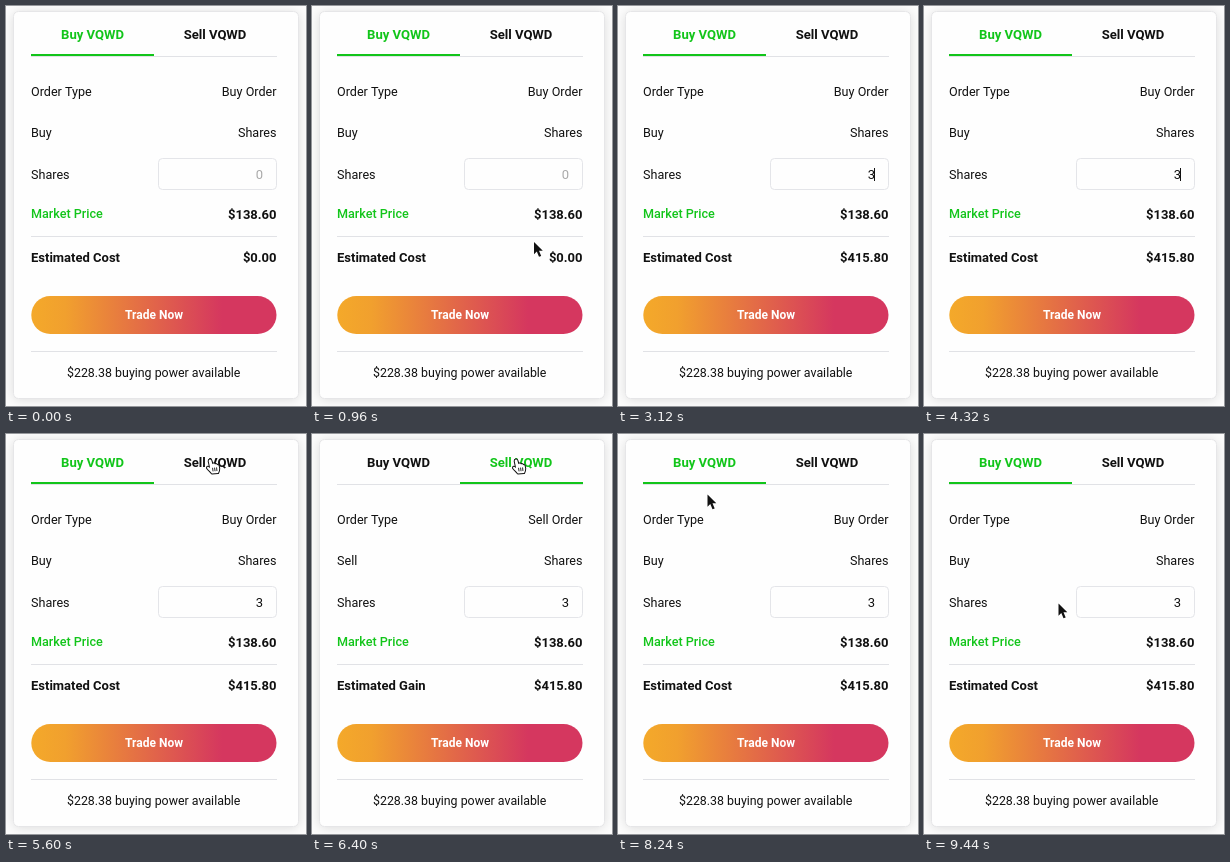
An HTML page with a canvas for the animation above (9520 ms loop, 300 px wide and 400 px high).

```html
<!DOCTYPE html>
<html lang="en">
<head>
<meta charset="utf-8">
<title>Trade card</title>
<style>
html, body { margin: 0; width: 100%; height: 100%; overflow: hidden; background: #fdfdfd; }
canvas { display: block; width: 300px; height: 400px; }
</style>
</head>
<body>
<canvas id="stage"></canvas>
<script>
const LOOP = 9520, STEP = 80;
const FOCUS = 1520, TYPED = 2880, SELL = 5680, BUY = 7280;
const PRICE = 138.6, SYMBOL = 'VQWD';
const GREEN = '#12c51a', INK = '#111', LINE = '#e1e2e6';

// Pointer stops: time, x, y
const PATH = [
  [80, 196, 352], [960, 222, 236], [1440, 228.5, 179],
  [4720, 228.5, 179], [5440, 205, 26], [6400, 205, 26],
  [7040, 95, 31], [7680, 95, 31], [8160, 89.5, 60.5],
  [8640, 89.5, 60.5], [9360, 134.5, 169.5]
];

const canvas = document.getElementById('stage');
const ctx = canvas.getContext('2d');
const ratio = window.devicePixelRatio || 1;
canvas.width = 300 * ratio;
canvas.height = 400 * ratio;

function text(str, x, y, { align = 'left', size = 12.6, weight = 400, color = INK } = {}) {
  ctx.font = `${weight} ${size}px Roboto, sans-serif`;
  ctx.textAlign = align;
  ctx.fillStyle = color;
  ctx.fillText(str, x, y);
}

function box(x, y, w, h, r, fill, stroke) {
  ctx.beginPath();
  ctx.roundRect(x, y, w, h, r);
  ctx.fillStyle = fill;
  ctx.fill();
  if (stroke) {
    ctx.strokeStyle = stroke;
    ctx.lineWidth = 1;
    ctx.stroke();
  }
}

function bar(x, y, w, h, color) {
  ctx.fillStyle = color;
  ctx.fillRect(x, y, w, h);
}

function row(label, value, y, bold) {
  const style = bold ? { weight: 600, size: 13 } : {};
  text(label, 25, y, style);
  text(value, 270.5, y, { ...style, align: 'right' });
}

function drawCard() {
  bar(0, 0, 300, 400, '#fdfdfd');
  ctx.save();
  ctx.shadowColor = 'rgba(0,0,0,.14)';
  ctx.shadowBlur = 12 * ratio;
  ctx.shadowOffsetY = ratio;
  box(7.5, 5.5, 285, 387, 5, '#fefefe');
  ctx.restore();
  box(7.5, 5.5, 285, 387, 5, '#fefefe', '#e6e6e8');
}

function drawTabs(selling) {
  const tab = (label, x, active) => text(`${label} ${SYMBOL}`, x, 32.5,
    { align: 'center', size: 13.1, weight: 600, color: active ? GREEN : INK });
  tab('Buy', 86.5, !selling);
  tab('Sell', 209, selling);
  bar(25, 50, 246, 1, LINE);
  bar(selling ? 148 : 25, 48, 123, 2, GREEN);
}

function drawField(t) {
  box(152.5, 152.5, 118, 31, 4, '#fefefe', '#e4e5e9');
  const typed = t >= TYPED;
  text(typed ? '3' : '0', 257, 173, { align: 'right', size: 13, color: typed ? INK : '#a9a9a9' });
  const since = t - (typed ? TYPED : FOCUS);
  if (t >= FOCUS && t < SELL && since % 1000 < 500) bar(256, 162, 1, 13, '#111');
}

function drawButton() {
  const g = ctx.createLinearGradient(25, 0, 270, 0);
  g.addColorStop(0, '#f4a92a');
  g.addColorStop(.14, '#f1a02e');
  g.addColorStop(.78, '#d5375f');
  g.addColorStop(1, '#d5375f');
  box(25.3, 290, 245.2, 38, 19, g);
  text('Trade Now', 148, 313.3, { align: 'center', size: 12, weight: 600, color: '#fff' });
}

function pointerAt(t) {
  if (t < PATH[0][0] || (t >= TYPED && t < 4720)) return null;
  const i = PATH.findIndex(p => p[0] > t);
  if (i < 0) return PATH[PATH.length - 1].slice(1);
  const [t0, x0, y0] = PATH[i - 1], [t1, x1, y1] = PATH[i];
  const u = (t - t0) / (t1 - t0), e = u * u * (3 - 2 * u);
  return [x0 + (x1 - x0) * e, y0 + (y1 - y0) * e];
}

function outline(shape, fill, stroke, width) {
  ctx.lineJoin = ctx.lineCap = 'round';
  ctx.lineWidth = width;
  ctx.strokeStyle = stroke;
  ctx.fillStyle = fill;
  ctx.stroke(shape);
  ctx.fill(shape);
}

const arrow = new Path2D('M0 0V12.2L2.8 9.6L5 14.8L7.2 13.9L5 8.8H8.8Z');
const beam = new Path2D('M-3-7Q0-7 0-5Q0-7 3-7M0-5V5M-3 7Q0 7 0 5Q0 7 3 7M-1.5 2H1.5');
const hand = new Path2D('M-1 7.4L-2.3 1.2Q-2.4-.2-1.2-.4T.4 .6L1.4 4.2Q1.8 3.4 2.8 3.6T4 4.6Q4.5 3.9 5.4 4.2T6.3 5.2Q7.2 4.8 7.7 5.8L8.2 8.5Q8.3 10.6 7.1 13L.9 13.6Q-.2 11.8-1.8 10.4T-4 7.9Q-4 6.3-2.4 6.9L-1 8');
const fingers = new Path2D('M1.6 8.2L2 11M3.6 8L4 10.8M5.6 7.8L5.9 10.6');

function drawPointer(x, y) {
  const onTab = y > 12 && y < 50, onButton = y > 290 && y < 328;
  const onField = x > 152 && y > 152 && y < 184;
  ctx.save();
  ctx.translate(x, y);
  if (onField) {
    ctx.lineCap = 'round';
    ctx.lineWidth = 2.6;
    ctx.strokeStyle = '#fff';
    ctx.stroke(beam);
    ctx.lineWidth = 1.2;
    ctx.strokeStyle = '#111';
    ctx.stroke(beam);
  } else if (onTab || onButton) {
    outline(hand, '#fff', '#111', 2);
    ctx.lineWidth = .9;
    ctx.stroke(fingers);
  } else {
    outline(arrow, '#111', '#fff', 1.8);
  }
  ctx.restore();
}

function draw(t) {
  ctx.setTransform(ratio, 0, 0, ratio, 0, 0);
  const selling = t >= SELL && t < BUY;
  const side = selling ? 'Sell' : 'Buy';
  const shares = t >= TYPED ? 3 : 0;

  drawCard();
  drawTabs(selling);
  row('Order Type', `${side} Order`, 89.5);
  row(side, 'Shares', 131);
  text('Shares', 25, 172.7);
  drawField(t);
  text('Market Price', 25, 211.7, { color: GREEN, weight: 500 });
  text('$' + PRICE.toFixed(2), 270.5, 213.3, { align: 'right', weight: 600, size: 13 });
  bar(25, 230, 246, 1, LINE);
  row(selling ? 'Estimated Gain' : 'Estimated Cost', '$' + (PRICE * shares).toFixed(2), 256.3, true);
  drawButton();
  bar(25, 345, 246, 1, LINE);
  text('$228.38 buying power available', 147.7, 371, { align: 'center', size: 12.4 });

  const pointer = pointerAt(t);
  if (pointer) drawPointer(...pointer);
}

const start = performance.now();
function tick() {
  const t = (performance.now() - start) % LOOP;
  draw(Math.floor(t / STEP) * STEP);
  requestAnimationFrame(tick);
}
tick();
</script>
</body>
</html>
```
